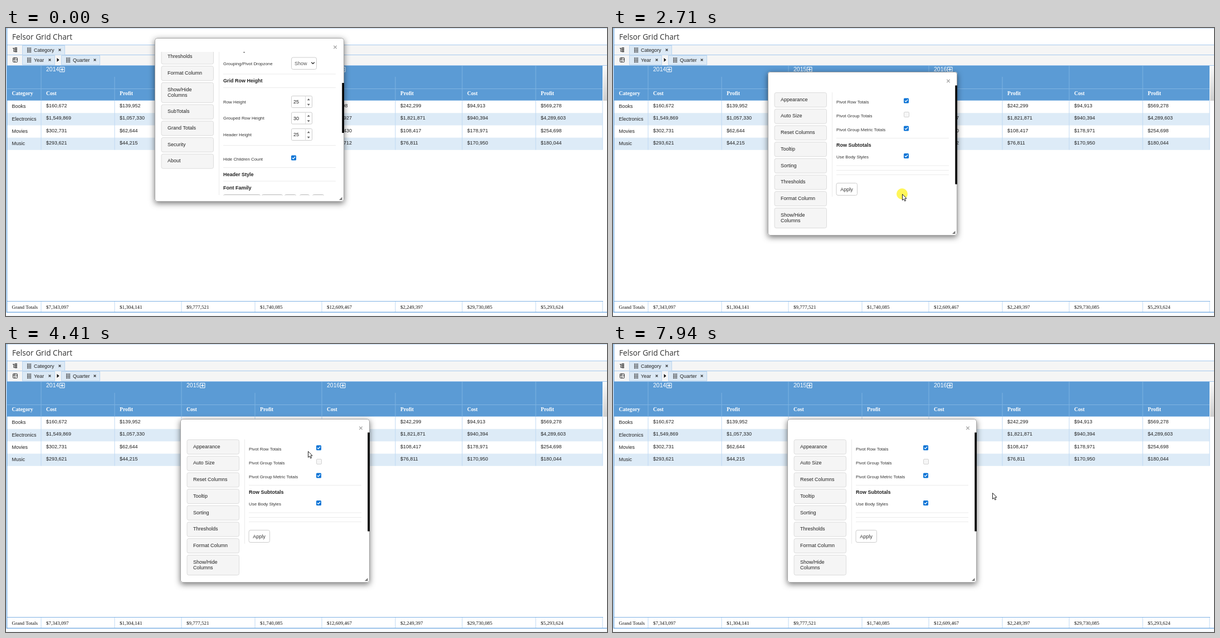
These frames come from a looping animation (1079 px wide and 519 px high, 8000 ms). An HTML page with a canvas:

```html
<!DOCTYPE html>
<html lang="en">
<head>
<meta charset="utf-8">
<title>Grid chart settings</title>
<style>
html, body { margin: 0; width: 100%; height: 100%; overflow: hidden; background: #fff; }
canvas { display: block; }
</style>
</head>
<body>
<canvas id="stage" width="1079" height="519"></canvas>
<script>
const ctx = document.getElementById('stage').getContext('2d');
const LOOP = 8000;
const SANS = '"Liberation Sans", Arial, sans-serif';
const SERIF = '"Liberation Serif", "Times New Roman", serif';
const OPEN = '"Open Sans", "Noto Sans", sans-serif';
const BLUE = '#5b9bd5', EDGE = '#a5c9ee', PALE = '#ddebf7', RULE = '#ebebeb';

// Each move starts where the last one ended; knots are [step, x, y]
const moves = [];
let last = [1052, 545];
function move(start, end, steps, ...knots) {
  const m = { start, end, steps, knots: [[0, ...last], ...knots] };
  last = knots[knots.length - 1].slice(1);
  moves.push(m);
  return m;
}
move(250, 860, 10, [2, 930, 462], [5, 600, 280], [10, 316, 152]);
move(1060, 1410, 6, [4, 314, 138], [6, 315, 149]);
const drag = move(2220, 2910, 11, [2, 395, 180], [5, 495, 219], [7, 506, 280], [8, 519, 299], [10, 541, 336], [11, 541, 336]);
move(3040, 3790, 12, [2, 515, 270], [5, 470, 184], [7, 447, 185], [12, 541, 188]);
move(3860, 4070, 4, [2, 569, 183], [4, 545, 189]);
move(4210, 5010, 13, [4, 542, 193], [7, 606, 178], [11, 524, 175], [13, 535, 205]);
move(5080, 5830, 12, [3, 515, 211], [8, 800, 104], [12, 982, 150]);
move(5970, 6730, 12, [2, 950, 89], [4, 800, 110], [7, 790, 268], [9, 897, 155], [12, 990, 130]);
move(6790, 7590, 13, [2, 1014, 94], [5, 900, 150], [11, 465, 274], [13, 449, 262]);
move(7660, 7940, 5, [1, 437, 256], [5, 681, 268]);

function stepOf({ start, end, steps }, t) {
  return 1 + Math.min(steps - 1, Math.floor((t - start) / (end - start) * (steps - 1) + 0.15));
}

// Smooth curve through the knots
function along(knots, k) {
  let i = 0;
  while (i < knots.length - 2 && k > knots[i + 1][0]) i++;
  const a = knots[i], b = knots[i + 1], span = b[0] - a[0], u = (k - a[0]) / span;
  const slope = (j, d) => {
    const p = knots[j - 1], q = knots[j + 1];
    return p && q ? (q[d] - p[d]) / (q[0] - p[0]) : 0;
  };
  return [1, 2].map(d => {
    const m0 = slope(i, d) * span, m1 = slope(i + 1, d) * span, v = b[d] - a[d];
    return a[d] + u * (m0 + u * (3 * v - 2 * m0 - m1 + u * (m0 + m1 - 2 * v)));
  });
}

function pointerAt(t) {
  const m = moves.filter(m => m.start <= t).pop();
  return m ? along(m.knots, stepOf(m, t)) : null;
}

// The dialog trails the pointer by one step
function dialogAt(t) {
  const k = t < drag.start ? 0 : stepOf(drag, t);
  const [x, y] = along(drag.knots, Math.max(5, k - 1));
  return [x - 228, y - 201];
}

function fill(x, y, w, h, color) {
  ctx.fillStyle = color;
  ctx.fillRect(x, y, w, h);
}
function text(s, x, y, size = 9, color = '#222', family = SANS, weight = '') {
  ctx.font = `${weight} ${size}px ${family}`;
  ctx.fillStyle = color;
  ctx.fillText(s, x, y);
}
function box(x, y, w, h, r, bg, edge) {
  ctx.beginPath();
  ctx.roundRect(x, y, w, h, r);
  if (bg) { ctx.fillStyle = bg; ctx.fill(); }
  if (edge) { ctx.strokeStyle = edge; ctx.lineWidth = 1; ctx.stroke(); }
}
function line(x1, y1, x2, y2, color, width = 1) {
  ctx.beginPath();
  ctx.moveTo(x1, y1);
  ctx.lineTo(x2, y2);
  ctx.strokeStyle = color;
  ctx.lineWidth = width;
  ctx.stroke();
}
function triangle(x, y, w, h, color) {
  ctx.beginPath();
  ctx.moveTo(x - w, y);
  ctx.lineTo(x + w, y);
  ctx.lineTo(x, y + h);
  ctx.fillStyle = color;
  ctx.fill();
}
function cross(x, y, r, color, width) {
  line(x - r, y - r, x + r, y + r, color, width);
  line(x - r, y + r, x + r, y - r, color, width);
}

function chip(label, x, y, w) {
  box(x + 0.5, y + 0.5, w - 1, 17, 0, '#dce9f5', '#bcd6ef');
  for (let r = 0; r < 4; r++)
    for (let c = 0; c < 3; c++) fill(x + 9 + c * 2.7, y + 4.5 + r * 2.4, 1.7, 1.6, '#333');
  text(label, x + 21, y + 11.5);
  cross(x + w - 9.5, y + 8.5, 1.9, '#222', 1.1);
}

// Column pairs repeat every 252 px
const colX = i => 63 + Math.floor(i / 2) * 252 + (i % 2) * 132;
const cols = [...'ABCDEFGH'].map((_, i) => colX(i));
// "-" marks cells that always stay behind the dialog
const rows = [
  'Books $160,672 $139,952 - - $317,598 $242,299 $94,913 $569,278',
  'Electronics $1,549,869 $1,057,330 - - $2,619,927 $1,821,871 $940,394 $4,289,603',
  'Movies $302,731 $62,644 - - $1,106,430 $108,417 $178,971 $254,698',
  'Music $293,621 $44,215 - - $1,042,712 $76,811 $170,950 $180,044'
];
const totals = '$7,343,097 $1,304,141 $9,777,521 $1,740,085 $12,609,467 $2,249,397 $29,730,085 $5,293,624';

function drawIcons() {
  const ink = '#333';
  line(12, 36.5, 16, 36.5, ink);
  line(14, 36, 14, 43, ink);
  for (let y = 35.5; y < 43; y += 3) {
    line(14, y + 1, 17, y + 1, ink);
    box(16.5, y, 3, 1.6, 0, '#fff', ink);
  }
  box(12.5, 53.5, 8, 8, 1, '#fff', ink);
  line(12, 56, 21, 56, ink);
  line(15, 53, 15, 62, ink);
  line(17, 60, 19, 57.5, ink);
  ctx.save();
  ctx.translate(91.5, 57.5);
  ctx.rotate(-Math.PI / 2);
  triangle(0, 0, 3.5, 4, '#111');
  ctx.restore();
}

function drawHeader() {
  fill(2, 68, 1069, 62, BLUE);
  fill(2, 109, 1069, 1, '#7fb3e2');
  fill(2, 130, 1069, 1, '#8ebbe6');
  const shade = ctx.createLinearGradient(0, 68, 0, 131);
  shade.addColorStop(0, '#fafafa');
  shade.addColorStop(1, '#cfcfcf');
  fill(1072, 68, 7, 63, shade);
  const title = (s, x) => text(s, x, 120.5, 9.7, '#fff', SERIF, 'bold');
  title('Category', 10.5);
  cols.forEach((x, i) => {
    const top = i % 2 && i < 7 ? 88 : 68;
    fill(x - 0.5, top, 1, 130 - top, '#7fb3e2');
    title(i % 2 ? 'Profit' : 'Cost', x + 9);
  });
  for (let i = 0; i < 3; i++) {
    const x = colX(i * 2) + 9;
    text(2014 + i, x, 78, 10.5, '#fff');
    box(x + 24.5, 70.5, 8.5, 8.5, 0, null, '#fff');
    line(x + 26, 74.7, x + 31.5, 74.7, '#fff', 1.3);
    line(x + 28.75, 72, x + 28.75, 77.5, '#fff', 1.3);
  }
}

function drawPage() {
  fill(0, 0, 1079, 519, '#fff');
  fill(0, 0, 1079, 1, '#c3daf2');
  text('Felsor Grid Chart', 11, 20.5, 13.7, '#333', OPEN);

  fill(2, 31, 1077, 36, '#f5f5f5');
  [30, 48, 67].forEach(y => fill(2, y, 1077, 1, EDGE));
  chip('Category', 29, 31, 77);
  chip('Year', 29, 49, 59);
  chip('Quarter', 99, 49, 70);
  drawIcons();
  drawHeader();

  rows.forEach((row, r) => {
    const y = 131 + r * 22.2;
    if (r % 2) fill(2, y, 1069, 22.2, PALE);
    row.split(' ').forEach((cell, c) => {
      if (cell !== '-') text(cell, c ? cols[c - 1] + 9 : 10.5, y + (c ? 12.2 : 13.3));
    });
  });
  [...cols, 1071].forEach(x => {
    fill(x - 0.5, 131, 1, 88.5, '#bfdaf3');
    fill(x - 0.5, 493, 1, 19, '#bfdaf3');
  });

  fill(2, 492, 1070, 1, '#7eb1e4');
  fill(2, 511.5, 1077, 1.5, '#7eb1e4');
  fill(0, 517.5, 1079, 1, '#eaf2fa');
  fill(0.8, 0, 1.4, 513, '#6fa9e2');
  const total = (s, x) => text(s, x, 505.5, 9, '#111', SERIF);
  total('Grand Totals', 10.5);
  totals.split(' ').forEach((v, i) => total(v, cols[i] + 9));
}

function drawStatus() {
  box(-4, 504.5, 260, 20, 3, '#dfe3e8', '#cdd1d6');
  text('ts.com:8443/MicroStrategy/servlet/mstrWeb#popupcoll...', 0.5, 516, 9.35, '#777c82', OPEN);
}

function tabs(names, y, linked) {
  names.forEach(name => {
    const lines = name.split('|'), h = 16.5 + lines.length * 10;
    box(12, y + 0.5, 93.5, h - 0.5, 3, '#f5f5f5', '#dcdcdc');
    lines.forEach((s, i) => text(s, 23, y + 15.7 + i * 10));
    if (name === linked) fill(23, y + 17, ctx.measureText(name).width, 1, '#222');
    y += h + 3.2;
  });
}
const rule = y => fill(123, y, 202, 1, RULE);
const label = (s, y) => text(s, 123, y, 7.9, '#333');
const heading = (s, y) => text(s, 123, y, 9, '#222', SANS, 'bold');

function check(x, y, on) {
  box(x, y, 9, 9, 1.5, on ? '#0a74d6' : '#f6f6f6', on ? null : '#d3d3d3');
  if (!on) return;
  line(x + 1.9, y + 4.5, x + 3.9, y + 6.5, '#fff', 1.4);
  line(x + 3.5, y + 6.6, x + 7.2, y + 2.5, '#fff', 1.4);
}
function spinner(name, value, y) {
  label(name, y + 13);
  box(245.5, y, 37, 21, 2, '#fff', '#ccc');
  fill(270, y, 1, 21, '#ddd');
  text(value, 249, y + 13.8);
  triangle(276.2, y + 7.8, 2.5, -3.3, '#666');
  triangle(276.2, y + 14.2, 2.5, 3.3, '#666');
}

function drawAppearance(hover) {
  ctx.save();
  ctx.beginPath();
  ctx.rect(0, 25, 334, 258.5);
  ctx.clip();
  tabs(['Thresholds', 'Format Column', 'Show/Hide|Columns', 'SubTotals', 'Grand Totals', 'Security', 'About'],
    20.5, hover && 'SubTotals');
  fill(115, 25, 1, 258, RULE);
  fill(159.5, 25, 2, 1.5, '#444');
  label('Grouping/Pivot Dropzone', 48.5);
  box(245.5, 35, 45, 21.5, 3, '#fff', '#ccc');
  text('Show', 251, 49, 9, '#555');
  line(281.2, 43.7, 284.3, 46.8, '#333', 1.4);
  line(283.7, 46.8, 286.8, 43.7, '#333', 1.4);
  [64.5, 89, 193, 233, 257.5].forEach(rule);
  heading('Grid Row Height', 79.5);
  spinner('Row Height', 25, 104.5);
  spinner('Grouped Row Height', 30, 134);
  spinner('Header Height', 25, 163.5);
  label('Hide Children Count', 221);
  check(245, 211.5, true);
  heading('Header Style', 249);
  heading('Font Family', 273.3);
  const field = (x, w) => box(x + 0.5, 282.5, w - 1, 20, 2, '#fff', '#b5b5b5');
  field(123, 67);
  field(192, 38);
  field(233, 21);
  field(260, 18);
  field(283, 21);
  ctx.restore();
  fill(336.3, 81, 3.7, 90, '#050505');
}

function drawSubtotals(hover) {
  tabs(['Appearance', 'Auto Size', 'Reset Columns', 'Tooltip', 'Sorting', 'Thresholds', 'Format Column', 'Show/Hide|Columns'],
    37, hover && 'Tooltip');
  fill(115, 37, 1, 188, RULE);
  const option = (name, y, on) => {
    label(name, y);
    check(on ? 244 : 244.5, y - 9.2, on);
  };
  option('Pivot Row Totals', 56.7, true);
  option('Pivot Group Totals', 81.7, false);
  option('Pivot Group Metric Totals', 106.7, true);
  heading('Row Subtotals', 135);
  option('Use Body Styles', 156.2, true);
  [119, 168.5, 177, 185].forEach(rule);
  box(123, 200.5, 37.5, 22, 3, '#fff', '#ccc');
  text('Apply', 130.3, 214.8, 9, '#333');
  fill(336.3, 24.5, 3.7, 178, '#050505');
}

function drawDialog([x, y], subtotals, hover) {
  ctx.save();
  ctx.translate(x, y);
  ctx.shadowColor = 'rgba(0,0,0,.55)';
  ctx.shadowBlur = 11;
  ctx.shadowOffsetY = 3;
  box(0, 0, 340, 295, 4, '#fff');
  ctx.shadowColor = 'transparent';
  box(0.5, 0.5, 339, 294, 4, null, 'rgba(0,0,0,.35)');
  cross(324, 16.5, 2.7, '#aaa', 1.4);
  (subtotals ? drawSubtotals : drawAppearance)(hover);
  for (let i = 0; i < 5; i++) fill(335.5 - i, 287 + i, i + 1, 1, '#777');
  ctx.restore();
}

const ARROW = new Path2D('M.5 .5V11.4L3 9.1 4.8 13 6.6 12.2 4.9 8.4 8 8.2Z');
const HAND = new Path2D('M-1.4 1.2Q0-.9 1.2 1.2V5L4.6 6Q5.6 6.4 5.4 8L4.4 12 4.2 14.5H-1.8L-2.2 12.3-4.6 8.6Q-4.2 6.6-1.4 9Z');

function drawPointer([x, y], hand) {
  const shape = hand ? HAND : ARROW;
  ctx.save();
  ctx.translate(x, y);
  ctx.fillStyle = '#fff';
  ctx.fill(shape);
  ctx.strokeStyle = '#222';
  ctx.lineWidth = 1;
  ctx.stroke(shape);
  if (hand) {
    line(1.2, 5, 1.2, 8, '#222', 0.7);
    line(3, 5.8, 3, 8.2, '#222', 0.7);
  }
  ctx.restore();
}

function draw(t) {
  const p = pointerAt(t);
  const hover = !!p && t < 2289 && Math.abs(p[0] - 310) < 22 && Math.abs(p[1] - 148.5) < 13.5;
  const k = t >= drag.start ? stepOf(drag, t) : 0;
  const pressed = (t >= 1700 && t < 1870) || (k >= 5 && k < 11);
  drawPage();
  drawDialog(dialogAt(t), t >= 1790, hover);
  if (t >= 1620 && t < 2280) drawStatus();
  if (pressed) {
    ctx.beginPath();
    ctx.arc(p[0], p[1], 10, 0, 7);
    ctx.fillStyle = 'rgba(255,244,60,.85)';
    ctx.fill();
  }
  if (p) drawPointer(p, hover);
}

function frame() {
  draw(performance.now() % LOOP);
  requestAnimationFrame(frame);
}
frame();
</script>
</body>
</html>
```
